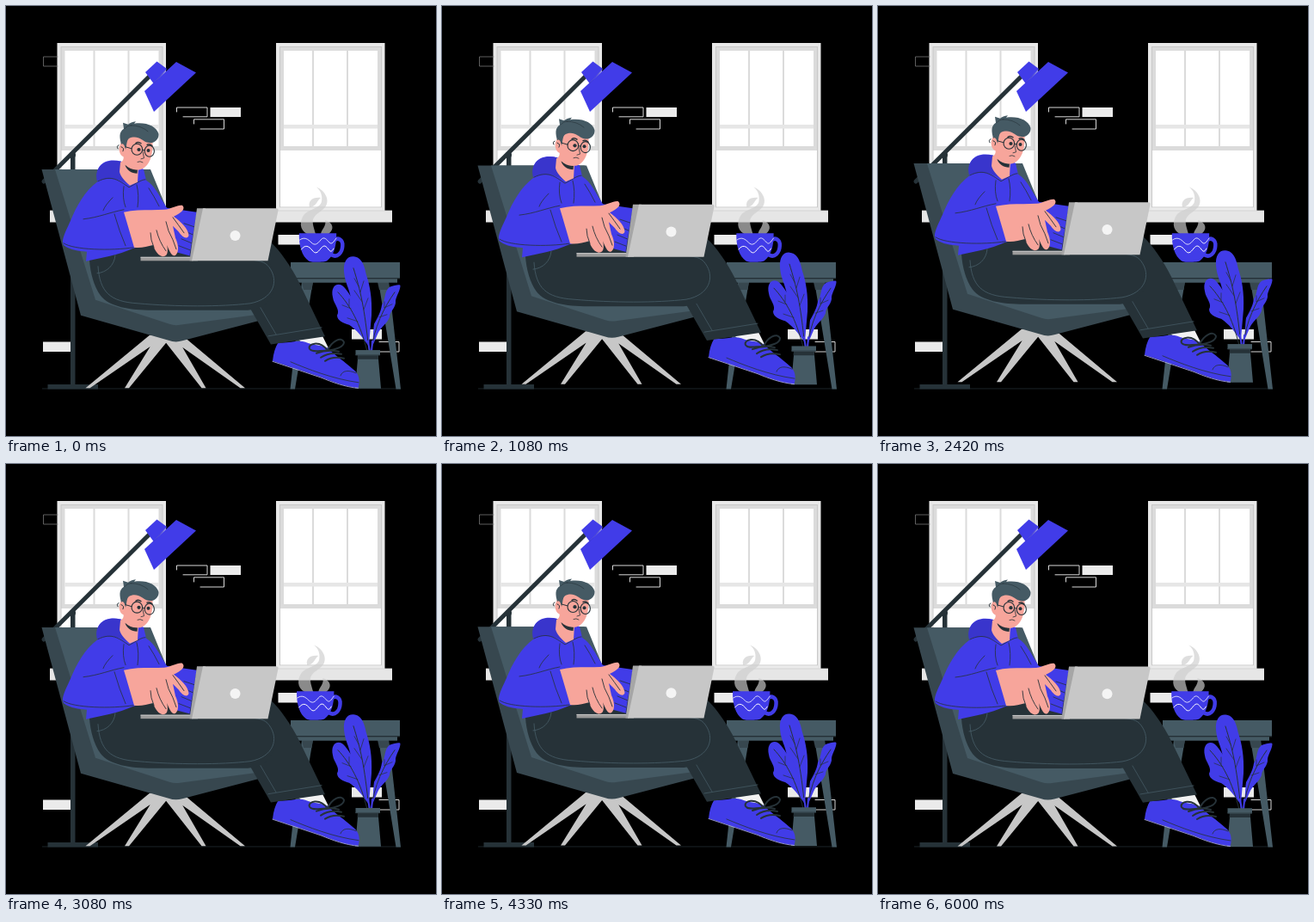
An HTML page with a canvas for the animation above (6.04 s loop, 500x500 px).

```html
<!DOCTYPE html>
<html lang="en">
<head>
<meta charset="utf-8">
<title>Working from the armchair</title>
<style>
html, body { margin: 0; width: 100%; height: 100%; overflow: hidden; background: #000; }
canvas { display: block; width: 100vw; height: 100vh; }
</style>
</head>
<body>
<canvas id="stage" width="500" height="500"></canvas>
<script>
const g = document.getElementById('stage').getContext('2d');
const LOOP = 6040, STEP = LOOP / 145, BOB = LOOP / 4, RISE = 9;
const BLUE = '#413ce8', DEEP = '#3935cc', DARK = '#263238', SLATE = '#455a64', SIDE = '#37474f';
const SKIN = '#f7a59b', METAL = '#c7c7c7', PALE = '#ebebeb', RULE = '#dbdbdb';

function fill(color, d) {
  g.fillStyle = color;
  g.fill(new Path2D(d));
}
function line(color, width, d) {
  g.strokeStyle = color;
  g.lineWidth = width;
  g.stroke(new Path2D(d));
}
function rect(color, x, y, w, h) {
  g.fillStyle = color;
  g.fillRect(x, y, w, h);
}
function disc(color, x, y, r) {
  g.fillStyle = color;
  g.beginPath();
  g.arc(x, y, r, 0, Math.PI * 2);
  g.fill();
}
function shifted(dx, dy, draw) {
  g.save();
  g.translate(dx, dy);
  draw();
  g.restore();
}

function pane() {
  rect('#e8e8e8', 0, 0, 126.5, 195);
  rect('#c8c8c8', 4, 4, 119, 191);
  rect(RULE, 5, 5, 117, 120);
  rect('#fff', 9, 9, 109, 111);
  rect('#fff', 5, 125, 117, 65.5);
  rect(RULE, 42, 9, 2, 111);
  rect(RULE, 82, 9, 2, 111);
  rect('#e6e6e6', 9, 95, 109, 4.5);
  rect(PALE, 4, 191.3, 119, 4);
  rect('#e6e6e6', -8.5, 195, 143.5, 13.5);
  rect('#cfcfcf', -8.5, 194.6, 143.5, 0.8);
}

function bricks() {
  rect(PALE, 237.5, 118, 35.5, 11);
  rect(PALE, 43, 390.5, 32, 11.5);
  rect(PALE, 316.5, 266, 36, 11.5);
  rect(PALE, 402, 376, 35, 11.5);
  line('#d8d8d8', 1, 'M198.500 123V118H234V128.800H206 M218.500 137V131.800H253.500V143H226');
  line('#777', 0.8, 'M60 59H43.500V70H60');
  line('#d8d8d8', 1, 'M434 390.500H457V402H434');
}

function lamp() {
  rect(DARK, 75, 172, 5.5, 269);
  rect(DARK, 48.5, 440, 58.5, 5.5);
  line(DARK, 5, 'M44 204L167 81.500');
  disc(DARK, 77.5, 173, 3.5);
  fill(BLUE, 'M198 65L221 77.500L172 123L161 99Z');
  fill(BLUE, 'M175.500 64.500L187 73L171.500 90L162 77Z');
  line(DEEP, 0.8, 'M186.500 74L171.500 90');
}

function table() {
  fill(SLATE, 'M344 320H357L336 445.500H330.500Z M433 320H445L459 445.500H453.500Z');
  fill(SIDE, 'M344 321H357L355.500 330H346Z M432 321H445V330H434Z');
  rect(SLATE, 338, 317, 117, 4.700);
  rect(SLATE, 331, 298, 127, 18.500);
  rect(DARK, 331, 316.300, 127, 1.100);
}

function steam() {
  g.globalAlpha = 0.67;
  fill('#cecece', 'M361 210.500C372 215 377 227 371 234C366 240 360 241 357 248C356 253 358 258 360 265H350C341 260 341 250 347 242C353 236 366 235 367 227C368 220 366 215 361 210.500Z');
  fill('#cecece', 'M353 234C351 227 356 222 366 223C361 227 361 233 353 234Z');
  fill('#cecece', 'M366 265C367 259 373 256 371 249C381 252 382 260 375 265Z');
  g.globalAlpha = 1;
}

function mug() {
  line(BLUE, 4.500, 'M381 273C386 268 392 272 391.300 279C391 287 385 293 379 289.500');
  fill(BLUE, 'M340.800 264.300H384.200C384.500 279 381 291 373 296.500C371 298 354 298.500 352 296.500C344 291 340.500 279 340.800 264.300Z');
  line('#fff', 0.8, 'M341.500 272C347 268 351 271 355 275S362 277 366 272S373 272 376 275S381 274 384 270');
  line('#fff', 1, 'M343.500 283C348 277 352 279 356 284S362 287 366 282S372 279 375 283S379 285 381 282');
}

function plant() {
  fill(BLUE, 'M422 395C416 380 407 360 401 340C399 328 394 322 393 309C392 297 397 291 404 291.500C414 292 417 303 419 313C423 325 426 340 425 360Z');
  fill(BLUE, 'M421 395C414 385 408 377 399 371C392 369 385 366 385 360C389 353 381 347 380 339C378 330 381 324 387 324C394 324 399 337 404 341C411 346 410 355 414 361C419 371 421 383 422 395Z');
  fill(BLUE, 'M426 396C427 387 427 376 428 370C433 361 436 355 437 348C442 341 439 333 446 327C452 325 459 323 458.500 326C458 332 454 337 453 343C454 351 446 355 446 362C443 370 435 374 432 382Z');
  line(DARK, 1, 'M404 305C412 331 417 350 422 402 M386 333C400 348 412 369 420 402 M452 333C440 350 427 375 425 402');
  line(DARK, 0.7, 'M410 326L405 317 M414 344L405 331 M412 333L416 320 M416 353L421 340 M401 352L391 348 M409 367L397 363 M399 349V341 M440 351L449 347 M434 362L443 359 M440 351V344');
  line(BLUE, 2, 'M421 390L423 402 M426 390L425 402');
  fill(SLATE, 'M409.500 405H432.500L436 445H406Z');
  fill(DARK, 'M409 405.500H432.500L433 411H408.500Z');
  rect(SLATE, 406.500, 400.300, 28.500, 6);
  rect(SIDE, 406.500, 405.300, 28.500, 1.200);
}

function chair() {
  fill(METAL, 'M167 383H187L97.500 444.500H92.500Z M174 386H191L143 444.500H138Z M183 388H200L232.500 444.500H227.500Z M188 385H207L278 444.500H272.500Z');
  fill(SIDE, 'M41.500 190.300H166L205 300L295 353V366L205 389.500Q197 392 189 389L87 360Z');
  fill(SLATE, 'M57 190.300H168L207 285L293 352V359L202 371Q196 372 190 370L104 342Z');
}

function leg() {
  fill('#f2f2f2', 'M340 388L367 382L375 398L348 395Z');
  fill(BLUE, 'M316.500 391.500C328 393 339 388 348 391C357 395 366 394 374 398C383 407 393 413 404 423C411 428 412 437 409.500 444.200C395 443 379 437 367 432L310 413C311 404 313 397 316.500 391.500Z');
  line('#b9b7f5', 0.8, 'M310 413.500L367 432.500C379 437.500 395 443.500 409.500 444.500');
  line(DARK, 0.8, 'M331 414C350 422 380 434 410 438 M389 430C391 424 398 423 407 427');
  line(DARK, 2, 'M361 404Q374 399 387 402 M366 409Q376 402 390 405 M371 413Q380 407 393 410 M374 401C365 388 350 393 353 399C356 404 367 400 374 401C378 390 390 384 393 391C393 397 382 400 374 401');
  fill(DARK, 'M307 274C319 285 332 304 341 322L371 384.500L308 393.800L284 352Z');
  line(SLATE, 0.8, 'M305 384L367 374 M293 346L314 382');
}

function body() {
  leg();
  fill(DARK, 'M100 288L150 279H216L294 288C307 294 315 310 312 328C309 346 296 354 278 354H170C144 354 120 350 110 337C102 326 98 310 97 296Z');
  line(SLATE, 0.9, 'M107 303C109 333 121 344 153 346C198 350 250 350 284 346C311 341 318 320 306 304C301 297 294 296 280 295 M127 290C126 302 117 310 106 311');

  fill(BLUE, 'M134 181C114 176 102 187 107 204C91 216 82 233 75 250C68 265 63 275 68 279C75 284 84 285 94 286L93 297C112 293 130 290 148 282L190 270L196 286L215 291L222 240L187 235C178 221 173 209 163 203L160 190Z');
  line(DARK, 0.8, 'M207 253L219 257 M208 262L217 266 M204 271L216 276 M201 279L214 284 M222 241L214 290');
  line(DARK, 0.8, 'M90 248C108 246 121 240 137 237 M67 276C78 284 123 285 148 281 M126 242Q132 263 139 279 M124 223Q115 232 113 238 M166 212Q172 221 178 233');
  fill(DEEP, 'M106 204C102 188 114 177 134 181L137 202L143 208C130 200 118 199 106 204Z');
  line(DARK, 0.8, 'M107 204C123 196 131 203 143 211C151 207 157 202 162 202 M137 210Q135 224 139 234 M152 208Q155 220 153 234');
}

function head() {
  fill(SKIN, 'M133 182C139 180 136 172 136 172L154 188L153 205L144 209C138 204 133 198 132 193Z');
  fill(DARK, 'M138.500 185C143 189 148 191 153 190.500L152.500 195C146 195 140 191 138.500 185Z');
  fill(SKIN, 'M138 149L170 153C172 168 169 187 156 190.500C146 192 139 184 138 176C132 175 130 166 133 161Z');
  fill(SLATE, 'M134 161C132 153 131 147 137 143L136 136L142 138Q145 135 151 134.500L149 137C163 135 175 140 177.500 149C178 156 171 161 165 159C158 157 155 151 146 153C139 154 141 163 139 167C138 162 136 159 134 161Z');
  line(DARK, 0.6, 'M145 139Q157 139 165 146 M138 143Q141 139 146 139');
  line(DARK, 1, 'M131 162Q128 163 130 166 M134 164Q138 165 136 169 M139 164L146 166 M158.500 167.500L161 168');
  line(DARK, 1.400, 'M151 159.500Q154 157.500 157 160 M164 161.500Q167 160 170 163');
  g.strokeStyle = DARK;
  g.lineWidth = 1.100;
  for (const [x, y, r] of [[152.300, 167, 6.300], [166.800, 169, 5.600]]) {
    g.beginPath();
    g.ellipse(x, y, r, 6.500, 0, 0, Math.PI * 2);
    g.stroke();
  }
  disc(DARK, 154.500, 167.200, 2.100);
  disc(DARK, 165.500, 168.200, 2);
  line(DARK, 0.8, 'M159 169L160.500 177L157 178 M153 181.500Q156 180 159 182');
}

function laptop() {
  rect('#9a9a9a', 156.500, 292, 61, 4.500);
  rect(METAL, 156.500, 292, 61, 1);
  fill('#a6a6a6', 'M222 235.500H232L223 296.500H213.500Z');
  fill(METAL, 'M229 235.500H314Q317 235.500 316.500 238L304.500 296.500H216Z');
  disc('#f4f4f4', 266.500, 267.300, 6);
}

function hand() {
  fill(SKIN, 'M137 240C153 236 170 238 184 237C193 236 199 231 205 232C209 236 205 240 195 245C203 251 212 259 212.500 267C211 273 204 268 201 263L194 256L197 270C203 283 199 291 195 290.500C191 290 187 278 184 269C190 283 189 292 182 291.500C175 290 172 281 171 278C164 280 157 282 149 281C145 267 141 253 137 240Z');
  line(DARK, 0.9, 'M194 246Q200 254 207 264 M186 251Q188 262 194 272L198 283 M175 261Q178 274 186 285 M168 264Q168 272 172 281');
}

// Sideways drift of the cup: [time, offset] turning points
const DRIFT = [[0, 0], [450, -3], [1080, 1.500], [1790, -4], [2400, 1], [3080, -2.800],
  [3650, 1], [4330, -2.800], [4850, 0.5], [5330, -1], [6000, 0.4], [LOOP, 0]];

function drift(t) {
  const i = DRIFT.findIndex(p => p[0] > t);
  const [a, x] = DRIFT[i - 1], [b, y] = DRIFT[i];
  return x + (y - x) * (1 - Math.cos(Math.PI * (t - a) / (b - a))) / 2;
}

function draw(t) {
  const dy = -RISE / 2 * (1 - Math.cos(2 * Math.PI * (t + 72) / BOB));
  const dx = drift(t);
  g.lineCap = 'round';
  g.lineJoin = 'round';
  rect('#000', 0, 0, 500, 500);
  shifted(59.500, 43, pane);
  shifted(314, 43, pane);
  bricks();
  rect(DARK, 42, 444.600, 417, 0.7);
  lamp();
  table();
  shifted(dx, 0, () => { steam(); mug(); });
  shifted(0, dy, () => {
    plant();
    chair();
    body();
    head();
    laptop();
    hand();
  });
}

const start = performance.now();
function tick() {
  const t = (performance.now() - start) % LOOP;
  draw(Math.floor(t / STEP) * STEP);
  requestAnimationFrame(tick);
}
tick();
</script>
</body>
</html>
```
